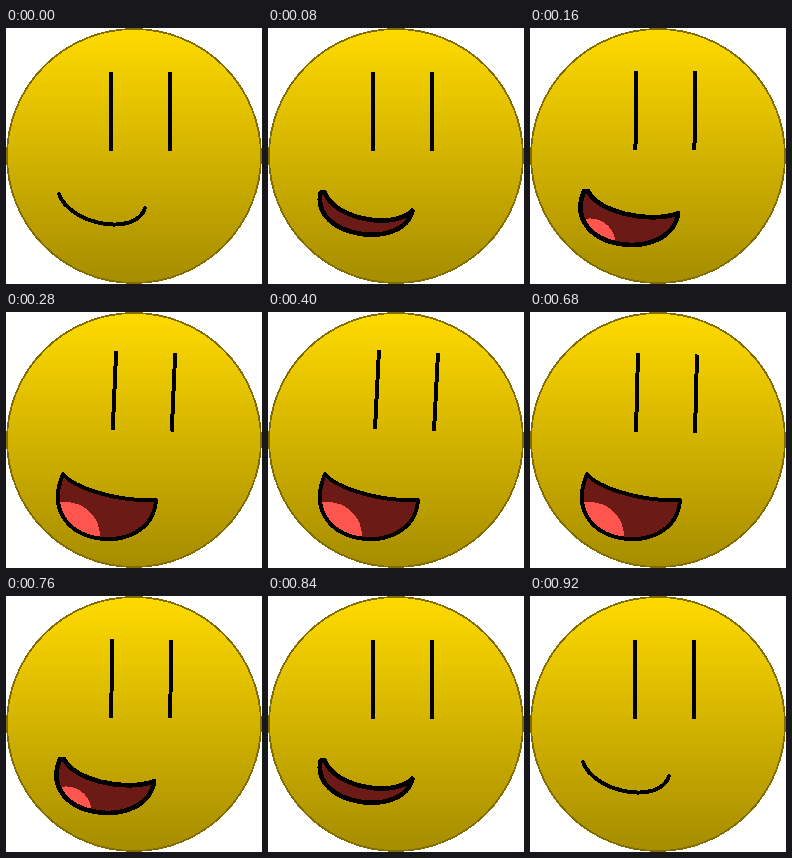
An HTML page for the animation above (0.96 s loop, 256x256 px).

```html
<!DOCTYPE html>
<html>
<head>
<meta charset="utf-8">
<title>Smile</title>
<style>
html, body { margin: 0; width: 100%; height: 100%; overflow: hidden; background: #fff; }
svg { display: block; width: 256px; height: 256px; }
</style>
</head>
<body>
<svg viewBox="0 0 256 256" shape-rendering="crispEdges" fill="none" stroke-linejoin="round">
  <defs>
    <linearGradient id="skin" x2="0" y2="1">
      <stop stop-color="#ffda00"/>
      <stop offset="1" stop-color="#a68c00"/>
    </linearGradient>
    <clipPath id="inside"><path id="opening"/></clipPath>
  </defs>
  <circle cx="128" cy="128" r="127" fill="url(#skin)" stroke="#806c00" stroke-width="1.8"/>
  <g stroke="#000" stroke-width="4">
    <path id="leftEye"/>
    <path id="rightEye"/>
  </g>
  <path id="mouth" fill="#6c1a16"/>
  <ellipse id="tongue" cx="60" fill="#ff554f" clip-path="url(#inside)"/>
  <path id="lips" stroke="#000" stroke-linecap="round"/>
</svg>
<script>
const LOOP = 960, STEP = 40;
const MOVE = 240, SHUT_AT = 920;

const byId = id => document.getElementById(id);
const mix = (a, b, k) => a + (b - a) * k;
const clamp = k => Math.max(0, Math.min(1, k));
const smooth = (from, to, t) => {
  const k = clamp((t - from) / (to - from));
  return k * k * (3 - 2 * k);
};

function set(id, attributes) {
  for (const name in attributes) byId(id).setAttribute(name, attributes[name]);
}

function drawEye(id, x, tilt, topLift, bottomLift) {
  const top = [x + 6 * tilt, 44 - topLift * tilt];
  const bottom = [x + 2 * tilt, 123 - bottomLift * tilt];
  set(id, { d: `M${top} L${bottom}` });
}

// The smile is one curve; opening pulls it apart into an upper and a lower lip.
function drawMouth(open) {
  const bulge = Math.sin(Math.PI * open);
  const point = (x0, y0, x1, y1, shift = 0) =>
    [mix(x0, x1, open) + shift * bulge, mix(y0, y1, open)];

  const upperStart = point(53, 166, 57, 162, 3);
  const lowerEnd = point(53, 166, 57, 162, -2);
  const right = point(139, 180, 150, 188, 2);
  const upper = `M${upperStart} C${point(64, 197, 68, 176)} ${point(130, 209, 112, 190)} ${right}`;
  const lower = `C${point(130, 209, 146, 250)} ${point(64, 197, 26, 236, -10)} ${lowerEnd} Z`;
  const outline = open > 0 ? upper + lower : upper;

  set('mouth', { d: open > 0 ? outline : '' });
  set('opening', { d: outline });
  set('lips', { d: outline, 'stroke-width': 4 + 0.8 * bulge });

  const size = 34 * open ** 0.7;
  set('tongue', { cy: mix(200, 224, open), rx: size, ry: size });
}

function draw(time) {
  const t = Math.floor((time % LOOP) / STEP) * STEP;
  const tilt = smooth(80, 340, t) - smooth(520, 840, t);
  drawEye('leftEye', 105, tilt, 6, 6);
  drawEye('rightEye', 164, tilt, 3, 4);
  drawMouth(clamp(Math.min(t, SHUT_AT - t) / MOVE));
}

let start;
function frame(now) {
  start ??= now;
  draw(now - start);
  requestAnimationFrame(frame);
}
draw(0);
requestAnimationFrame(frame);
</script>
</body>
</html>
```
